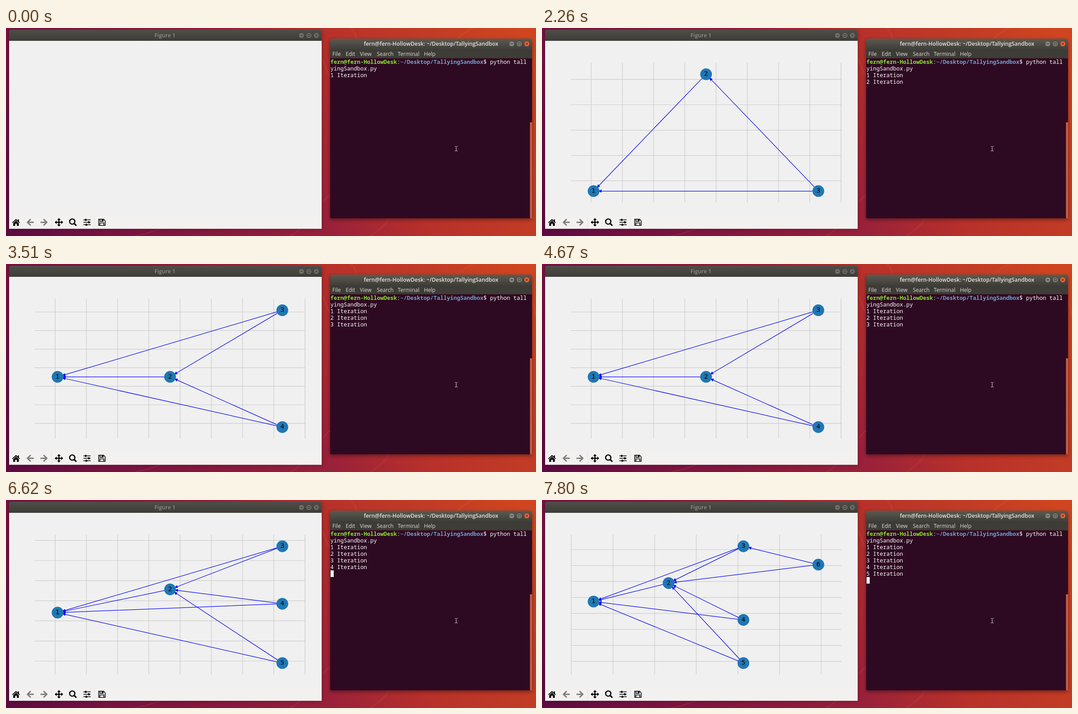
An HTML page for the animation above (8 s loop, 1192 by 470 pixels).

```html
<!DOCTYPE html>
<html lang="en">
<head>
<meta charset="utf-8">
<title>Figure and terminal</title>
<style>
  html, body { margin: 0; width: 100%; height: 100%; overflow: hidden; background: #901b3c; }
  svg { display: block; }
  text { white-space: pre; }
  .title { font: 600 12.3px "Open Sans", sans-serif; text-anchor: middle; }
  .menu { font: 12px "Open Sans", sans-serif; fill: #dfdbd2; }
  .term { font: 12.47px "Noto Sans Mono", monospace; fill: #fff; }
  .term .b { font-weight: 700; }
  .label { font: 14px "DejaVu Sans", sans-serif; text-anchor: middle; fill: #000; }
  .grid { stroke: #cbcbcb; stroke-width: 1.2; fill: none; }
  .edge { stroke: #00f; stroke-width: 1.25; fill: #00f; }
</style>
</head>
<body>
<svg id="stage" width="1192" height="470" viewBox="0 0 1192 470" xmlns="http://www.w3.org/2000/svg">
  <defs>
    <linearGradient id="wall" gradientUnits="userSpaceOnUse" x1="0" y1="470" x2="1100" y2="-100">
      <stop offset="0" stop-color="#5d0a42"/>
      <stop offset=".18" stop-color="#7a1240"/>
      <stop offset=".42" stop-color="#901b3c"/>
      <stop offset=".53" stop-color="#9a213a"/>
      <stop offset=".69" stop-color="#b8312a"/>
      <stop offset=".86" stop-color="#c23c25"/>
      <stop offset="1" stop-color="#d0451f"/>
    </linearGradient>
    <linearGradient id="bar" x1="0" y1="0" x2="0" y2="1">
      <stop offset="0" stop-color="#504e48"/>
      <stop offset="1" stop-color="#3d3c37"/>
    </linearGradient>
    <linearGradient id="activeBar" x1="0" y1="0" x2="0" y2="1">
      <stop offset="0" stop-color="#5b5a52"/>
      <stop offset="1" stop-color="#3f3e39"/>
    </linearGradient>
    <filter id="soft" x="-10%" y="-10%" width="120%" height="120%"><feGaussianBlur stdDeviation="5"/></filter>
  </defs>

  <rect width="1192" height="470" fill="url(#wall)"/>
  <g fill="none" stroke="#ff7a50" stroke-opacity=".14" stroke-width="2">
    <path d="M776 0Q790 14 788 30M1010 30Q1030 8 1052 0M712 70Q722 100 730 112M712 395Q722 380 730 376"/>
    <path d="M290 470Q330 462 350 452M640 470Q655 462 662 452M820 470Q850 450 862 430M1183 80Q1190 100 1192 120"/>
  </g>

  <!-- figure window -->
  <rect x="7" y="8" width="703" height="446" fill="#000" opacity=".3" filter="url(#soft)"/>
  <path d="M7 29V9Q7 4 12 4H705Q710 4 710 9V29Z" fill="url(#bar)"/>
  <text class="title" x="357.5" y="21" fill="#8f8d85">Figure 1</text>
  <rect x="7" y="29" width="703" height="424.5" fill="#f0f0f0"/>
  <rect x="7" y="423" width="703" height="30.5" fill="#f2f1f0"/>
  <path d="M102.5 423V453M198.5 423V453" stroke="#e2e1df"/>
  <g id="figButtons"></g>
  <g id="tools">
    <path d="M22.5 431.5L26.5 435V432.5H29V437.3L31.3 439.4L30.2 440.7L22.5 434.2L14.8 440.7L13.7 439.4Z"/>
    <path d="M22.5 435.6L28.8 441V447H24.4V442.3H20.6V447H16.2V441Z"/>
    <g id="arrow" fill="none" stroke="#7b7c79" stroke-width="3">
      <path d="M62.5 439H49.5M55.5 431.8L48.3 439L55.5 446.2"/>
    </g>
    <use href="#arrow" transform="matrix(-1 0 0 1 140 0)"/>
    <path d="M119 429.5L123 433.8H120.3V437.7H124.2V435L128.5 439L124.2 443V440.3H120.3V444.2H123L119 448.5L115 444.2H117.7V440.3H113.8V443L109.5 439L113.8 435V437.7H117.7V433.8H115Z"/>
    <g fill="none" stroke="#000" stroke-width="2.6">
      <circle cx="149" cy="437.4" r="5.9"/>
      <path d="M153.4 441.8L158.2 446.6" stroke-width="3.2"/>
    </g>
    <path d="M174 433.5H190.5M174 439H190.5M174 444.5H190.5" stroke="#000" stroke-width="1.7"/>
    <path d="M177.5 431.2H181V435.8H177.5ZM184.5 436.7H188V441.3H184.5ZM179 442.2H182.5V446.8H179Z"/>
    <path d="M208.5 432H219.5L223 435.5V446H208.5ZM211.5 432V437H218.5V432M211 446V440.5H220V446" fill="none" stroke="#000" stroke-width="1.6"/>
    <rect x="215.2" y="432" width="2.6" height="4.5"/>
  </g>
  <g id="graphs"></g>

  <!-- terminal window -->
  <rect x="729" y="28" width="454" height="405" fill="#000" opacity=".42" filter="url(#soft)"/>
  <path d="M729 48V29Q729 24 734 24H1178Q1183 24 1183 29V48Z" fill="url(#activeBar)"/>
  <rect x="729" y="48" width="454" height="20.5" fill="#3d3c37"/>
  <rect x="729" y="68.5" width="454" height="361.5" fill="#2e0a22"/>
  <rect x="1178.5" y="213" width="4.5" height="217" fill="#c75f43"/>
  <text class="title" x="956" y="40" fill="#e8e4da">fern@fern-HollowDesk: ~/Desktop/TallyingSandbox</text>
  <g id="termButtons"></g>
  <g id="menu"></g>
  <g id="lines">
    <text class="term" x="729.6" y="81"><tspan class="b" fill="#8ae234">fern@fern-HollowDesk</tspan>:<tspan class="b" fill="#729fcf">~/Desktop/TallyingSandbox</tspan>$ python tall</text>
    <text class="term" x="729.6" y="96">yingSandbox.py</text>
  </g>
  <rect id="cursor" x="730" width="7" height="15" fill="#fff"/>
  <path d="M1009.5 267.5H1011.5L1012.5 268.5L1013.5 267.5H1015.5M1012.5 268.5V277M1009.5 278H1011.5L1012.5 277L1013.5 278H1015.5" fill="none" stroke="#e6e0e4"/>
</svg>
<script>
  const NS = "http://www.w3.org/2000/svg";
  const LOOP = 8000;
  const $ = id => document.getElementById(id);

  function add(parent, tag, attrs, content) {
    const el = document.createElementNS(NS, tag);
    for (const key in attrs) el.setAttribute(key, attrs[key]);
    if (content !== undefined) el.textContent = content;
    parent.appendChild(el);
    return el;
  }

  function addButtons(parent, xs, y, fill, closeFill, glyph) {
    const marks = ["M-3 0H3", "M-2.5 -2.5H2.5V2.5H-2.5Z", "M-2.4 -2.4L2.4 2.4M2.4 -2.4L-2.4 2.4"];
    xs.forEach((x, i) => {
      const g = add(parent, "g", { transform: `translate(${x} ${y})` });
      add(g, "circle", { r: 6.3, fill: i === 2 ? closeFill : fill, stroke: "#35342f", "stroke-width": .8 });
      add(g, "path", { d: marks[i], fill: "none", stroke: glyph, "stroke-width": 1.2 });
    });
  }
  addButtons($("figButtons"), [664.5, 681.3, 698], 16.7, "#706e67", "#706e67", "#3b3a36");
  addButtons($("termButtons"), [1137.5, 1154.5, 1171.3], 35.7, "#85837b", "#ee6237", "#3b3a36");

  const menu = { File: 734, Edit: 764, View: 796, Search: 834, Terminal: 881, Help: 940 };
  for (const name in menu) add($("menu"), "text", { class: "menu", x: menu[name], y: 63 }, name);

  // Grid axes are [first, step, count]; links are [from, to].
  const wide = [110.5, 70.25, 9];
  const links = [[2, 1], [3, 1], [3, 2], [4, 1], [4, 2], [5, 1], [5, 2], [6, 2], [6, 3]];
  const graphs = [
    { at: 780, gx: wide, gy: [116.2, 57.3, 5],
      nodes: [[116, 368.5], [369, 104.5], [621.5, 368.5]] },
    { at: 2810, gx: wide, gy: [108.5, 41.95, 7],
      nodes: [[116, 255], [369, 255], [621.5, 104.5], [621.5, 368.5]] },
    { at: 4840, gx: wide, gy: [91.3, 45.45, 7],
      nodes: [[116, 254.5], [369, 202], [621.5, 104.5], [621.5, 234.5], [621.5, 368.5]] },
    { at: 6790, gx: [66, 93.65, 7], gy: [112, 36.1, 8],
      nodes: [[116, 229.5], [284.7, 187.7], [453, 104.5], [453, 271], [453, 368.5], [621.5, 146]] }
  ];

  const ticks = ([start, step, n]) => Array.from({ length: n }, (_, i) => start + step * i);

  function addEdge(parent, [x1, y1], [x2, y2]) {
    const angle = Math.atan2(y2 - y1, x2 - x1) * 180 / Math.PI;
    const tip = Math.hypot(x2 - x1, y2 - y1) - 12;
    add(parent, "path", {
      class: "edge",
      transform: `translate(${x1} ${y1}) rotate(${angle})`,
      d: `M12 0H${tip - 4}M${tip} 0L${tip - 5.2} -2.4V2.4Z`
    });
  }

  for (const graph of graphs) {
    const g = graph.el = add($("graphs"), "g", {});
    const grid = ticks(graph.gx).map(x => `M${x} 78.5V394`).join("") +
      ticks(graph.gy).map(y => `M65 ${y}H673`).join("");
    add(g, "path", { class: "grid", d: grid });
    const { nodes } = graph;
    for (const [from, to] of links)
      if (from <= nodes.length) addEdge(g, nodes[from - 1], nodes[to - 1]);
    nodes.forEach(([x, y], i) => {
      add(g, "circle", { cx: x, cy: y, r: 13.2, fill: "#1f77b4" });
      add(g, "text", { class: "label", x: x, y: y + 3.8 }, i + 1);
    });
  }

  const printTimes = [0, 950, 2960, 4910, 6940];
  const blinkTimes = [480, 1100, 1710, 2260, 2880, 3510, 4060, 4670, 5370, 6000, 6620, 7170, 7800];
  const printed = printTimes.map((_, i) =>
    add($("lines"), "text", { class: "term", x: 729.6, y: 111 + 15 * i }, `${i + 1} Iteration`));

  const passed = (times, t) => times.filter(at => at <= t).length;
  const show = (el, on) => el.setAttribute("visibility", on ? "visible" : "hidden");

  function draw(t) {
    const count = passed(printTimes, t);
    const current = passed(graphs.map(g => g.at), t) - 1;
    graphs.forEach((g, i) => show(g.el, i === current));
    printed.forEach((line, i) => show(line, i < count));
    $("cursor").setAttribute("y", 99 + 15 * count);
    show($("cursor"), passed(blinkTimes, t) % 2 === 1);
  }

  const start = performance.now();
  function tick() {
    draw((performance.now() - start) % LOOP);
    requestAnimationFrame(tick);
  }
  draw(0);
  requestAnimationFrame(tick);
</script>
</body>
</html>
```
